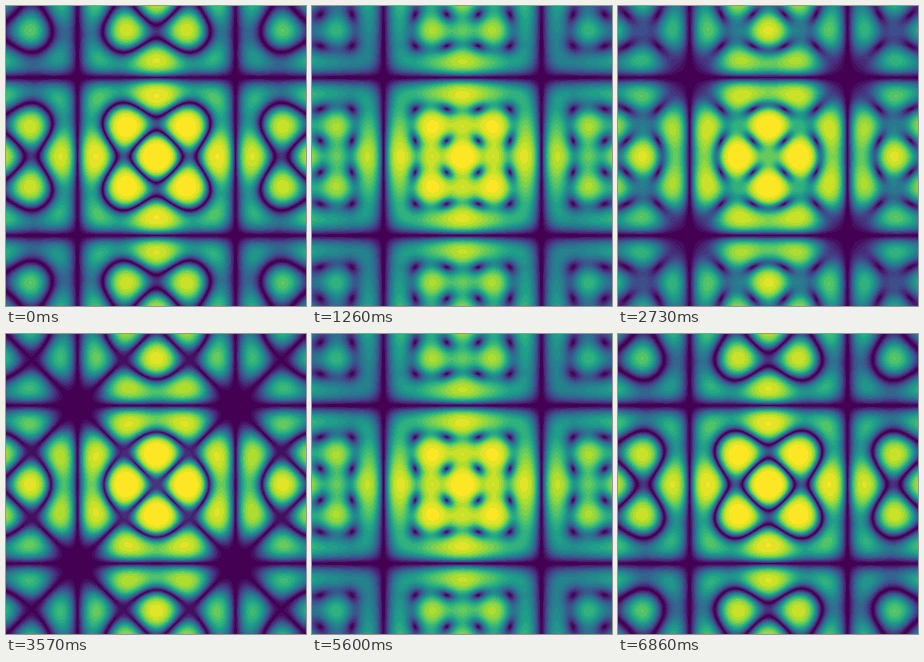
An HTML page with a canvas for the animation above (6930 ms loop, 300 px wide and 300 px high).

```html
<!DOCTYPE html>
<html lang="en">
<head>
<meta charset="utf-8">
<title>Interfering standing waves</title>
<style>
  html, body { margin: 0; width: 100%; height: 100%; overflow: hidden; background: #440154; }
  canvas { display: block; width: 100vw; height: 100vh; }
</style>
</head>
<body>
<canvas id="stage" width="300" height="300"></canvas>
<script>
const SIZE = 300, CENTER = 150.5, CELL = 158;
const STEP_MS = 70, STEPS = 99, BANDS = 26;
const GAIN = 6.6, SPREAD = 155, POWER = 1.3;

const context = document.getElementById('stage').getContext('2d');
const picture = context.createImageData(SIZE, SIZE);
const pixels = new Uint32Array(picture.data.buffer);

// Viridis, from dark purple to yellow
const stops = ['440154', '482878', '3e4a89', '31688e', '26828e',
               '1f9e89', '35b779', '6ece58', 'b5de2b', 'fde725']
  .map(hex => [0, 2, 4].map(i => parseInt(hex.slice(i, i + 2), 16)));

function colorAt(level) {
  const position = level * (stops.length - 1);
  const index = Math.min(Math.floor(position), stops.length - 2);
  const mix = position - index;
  const [r, g, b] = stops[index].map((c, i) => Math.round(c + (stops[index + 1][i] - c) * mix));
  return (255 << 24 | b << 16 | g << 8 | r) >>> 0;
}
const palette = Array.from({ length: BANDS }, (_, i) => colorAt(i / (BANDS - 1)));

const wave = order => Float64Array.from({ length: SIZE }, (_, i) =>
  Math.cos(order * Math.PI * (i + 0.5 - CENTER) / CELL));
const low = wave(1), high = wave(5);
const falloff = Float64Array.from({ length: SIZE }, (_, i) =>
  Math.exp(-(((i + 0.5 - CENTER) / SPREAD) ** 2)));

// Two crossed modes, added with a turning relative phase
function draw(step) {
  const cosPhase = Math.cos(2 * Math.PI * step / (STEPS - 1));
  for (let y = 0; y < SIZE; y++) {
    for (let x = 0; x < SIZE; x++) {
      const a = low[x] * high[y], b = high[x] * low[y];
      const power = Math.max(0, a * a + b * b + 2 * a * b * cosPhase) / 4;
      const strength = GAIN * falloff[x] * falloff[y] * Math.pow(power, POWER / 2);
      const level = 1 - Math.exp(-strength);
      pixels[y * SIZE + x] = palette[Math.min(BANDS - 1, Math.floor(level * BANDS))];
    }
  }
  context.putImageData(picture, 0, 0);
}

const start = performance.now();
let shown = -1;
function tick() {
  const step = Math.floor((performance.now() - start) / STEP_MS) % STEPS;
  if (step !== shown) draw(shown = step);
  requestAnimationFrame(tick);
}
tick();
</script>
</body>
</html>
```
